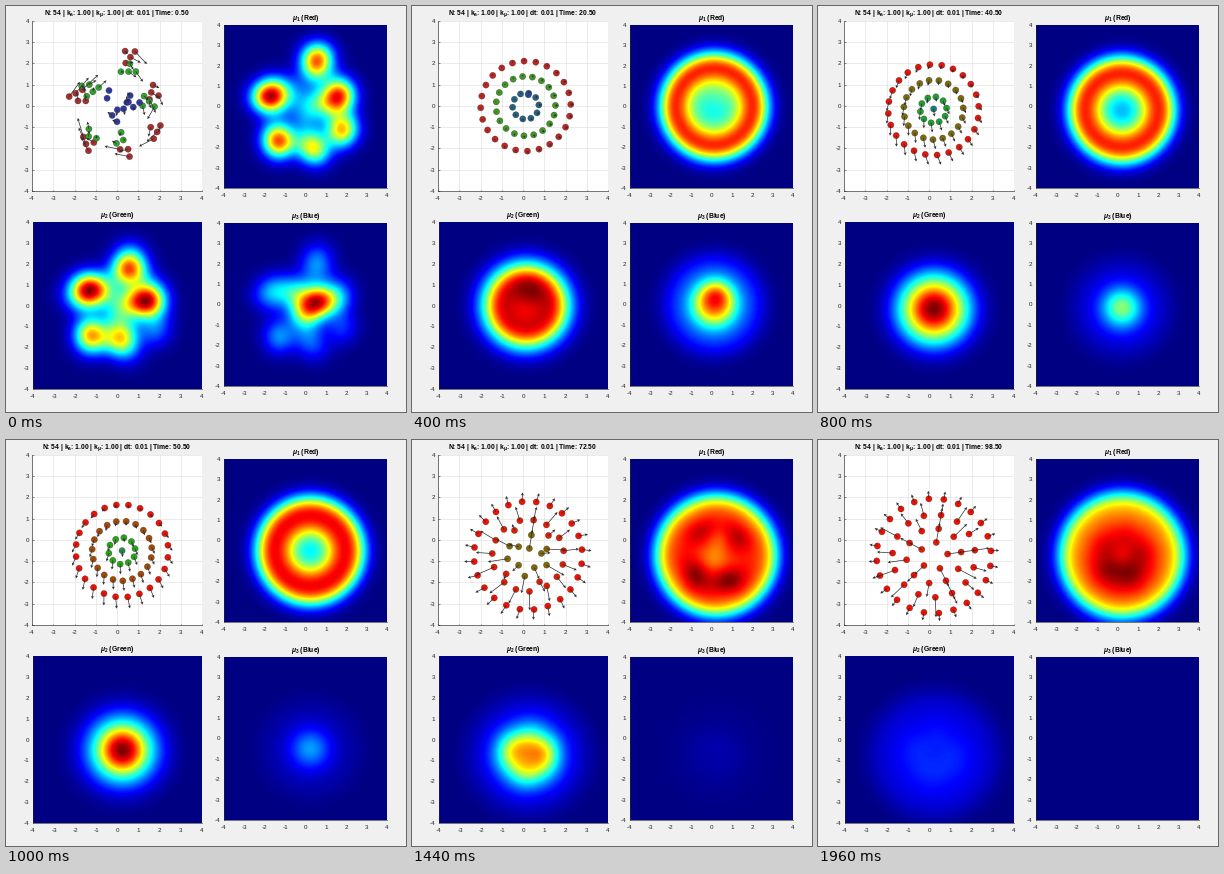
A matplotlib script that plays this animation: 400 by 406 pixels, repeating every 2 s.

```python
import numpy as np
import matplotlib.pyplot as plt
from matplotlib.animation import FuncAnimation
from matplotlib.colors import ListedColormap

W, H, DPI = 400, 406, 64
FRAMES, STEP = 50, 40
PT = 72 / DPI  # points per pixel

plt.rcParams.update({
    "font.family": "Liberation Sans",
    "mathtext.fontset": "custom",
    "mathtext.rm": "Liberation Sans:bold",
    "mathtext.it": "Liberation Sans:italic:bold",
    "axes.unicode_minus": False,
    "toolbar": "None",
})

SIZES = [24, 19, 10, 1]  # outer, mid, inner, core
GROUP = np.repeat(np.arange(4), SIZES)
SIGMA = 0.53
HUB = np.array([.23, -.75])
rng = np.random.default_rng(4)


def rise(t, mid, width):
    return 1 / (1 + np.exp((mid - t) / width))


def mix(a, b, u):
    return a + u * (b - a)


def ring(n, radius, phase=0):
    """n points evenly spaced clockwise from the top."""
    a = np.radians(phase + 360 * np.arange(n) / n)
    return radius * np.column_stack([np.sin(a), np.cos(a)])


def by_angle(p):
    return p[np.argsort(np.arctan2(p[:, 0], p[:, 1]) % (2 * np.pi))]


def clump(x, y, n):
    """Small sunflower of n points."""
    k = np.arange(n)
    a = 2.4 * k + rng.uniform(0, 2 * np.pi)
    r = .22 * np.sqrt(k + .4)
    return np.column_stack([x + r * np.cos(a), y + r * np.sin(a)])


# Clumps (x, y, count) of the scattered start
START = np.vstack([by_angle(np.vstack([clump(*c) for c in group])) for group in (
    [(.5, 2.35, 4), (1.75, .65, 4), (1.75, -1.2, 4),
     (.4, -2.1, 3), (-1.35, -1.7, 4), (-1.85, .5, 5)],
    [(.5, 1.75, 4), (1.45, .1, 4), (.2, -1.5, 3), (-1.2, -1.4, 3), (-1.25, .75, 5)],
    [(.6, .15, 5), (-.1, -.5, 3), (-.5, .5, 2)],
    [(.4, .2, 1)])])


def shells():
    """Closing layout: shells of 24, 15, 10 and 5 shared among the groups."""
    s24, s15, s10, s5 = (ring(n, r, 10) for n, r in
                         ((24, 2.7), (15, 1.95), (10, 1.3), (5, .65)))
    far = np.arange(10) % 5 % 3 == 1
    return HUB + np.vstack([s24, by_angle(np.vstack([s15, s10[far]])),
                            by_angle(np.vstack([s10[~far], s5[1:]])), s5[:1]])


LAST = shells()


def spread(t):
    return rise(t, 72, 5)


def home(t):
    """Concentric rings that sink, then open out into the shells."""
    radii = (2.12 + .3 * rise(t, 60, 6), 1.4, .62, .6 * rise(-t, -30, 4))
    phase = 13 - 6 * rise(t, 42, 5)
    rings = np.vstack([ring(n, r, phase) for n, r in zip(SIZES, radii)])
    rings += [.1 + .15 * rise(t, 32, 8), -.72 * rise(t, 46, 5)]
    return mix(rings, LAST, spread(t))


# Times at which each group turns from blue to green and from green to red
GREENED = np.array([-99, -99, 28, 45])[:, None]
REDDENED = np.array([-99, 43, 74, 74])[:, None]
RED_WIDTH = np.array([9, 13, 8, 8])[:, None]
DULL = .2 + .44 * np.eye(3)
VIVID = np.array([(.95, .06, .01), (.12, .70, .04), (.02, .40, .75)])


def colours(t):
    red, green, blue = mix(DULL, VIVID, rise(t, 28, 9))
    c = mix(blue, green, rise(t, GREENED, 9))
    return mix(c, red, rise(t, REDDENED, RED_WIDTH))[GROUP]


VARY = rng.uniform(.5, 1.4, len(GROUP))
REACH = np.where(GROUP == 0, .28, .65 * VARY)


def swarm(t):
    goal = home(t)
    pos = mix(goal, START, np.exp((.5 - t) / 3))
    out = goal - goal.mean(axis=0)
    out /= np.maximum(np.hypot(*out.T), .05)[:, None]
    push = out * (.1 + REACH * spread(t))[:, None]
    pull = .45 * (goal - pos)
    return pos, push + pull + 12 * (home(t + 1) - goal), colours(t)


def peaks(t):
    """Highest colour level of the red, green and blue fields."""
    return (1 - .16 * np.exp(-((t - 30) / 27) ** 4),
            .16 + .84 * rise(-t, -76, 4),
            rise(-t, -41, 10))


GRID = np.linspace(-4, 4, 101)


def fields(t, pos, rgb):
    gx, gy = (np.exp(-(GRID[:, None] - p) ** 2 / (2 * SIGMA ** 2)) for p in pos.T)
    # the middle gains weight as the rings open
    near = np.exp(-((pos - HUB - [0, -.3]) ** 2).sum(axis=1) / 2)
    weight = 1 + .6 * spread(t) * near
    for k, peak in enumerate(peaks(t)):
        f = (gy * (weight * rgb[:, k])) @ gx.T
        yield peak * f / f.max()


def jet():
    x = 4 * np.arange(1, 257) / 256
    return ListedColormap(np.clip(
        np.column_stack([1.5 - abs(x - c) for c in (3, 2, 1)]), 0, 1))


fig = plt.figure(figsize=(W / DPI, H / DPI), dpi=DPI, facecolor="#f0f0f0")


def panel(x0, y0, x1, y1, gap):
    ax = fig.add_axes([x0 / W, 1 - y1 / H, (x1 - x0) / W, (y1 - y0) / H])
    ax.set(xlim=(-4, 4), ylim=(-4, 4), xticks=range(-4, 5), yticks=range(-4, 5))
    ax.tick_params(length=0, labelsize=6.3 * PT, labelcolor="#262626")
    ax.tick_params(axis="x", pad=5 * PT)
    ax.tick_params(axis="y", pad=gap * PT)
    ax.spines[["top", "right"]].set_visible(False)
    ax.spines[["left", "bottom"]].set(linewidth=.6 * PT, color="#262626")
    return ax


def heading(x, y, s):
    return fig.text(x / W, 1 - y / H, s, ha="center", va="baseline",
                    weight="bold", size=6.75 * PT)


dots_ax = panel(26, 15, 196, 185, 3)
dots_ax.grid(color="#dfdfdf", linewidth=.6 * PT)
dots_ax.set_axisbelow(True)
dots_ax.tick_params(length=1.5 * PT, width=.5 * PT, direction="in", color="#262626")
title = heading(111, 9, "")

zero = np.zeros(len(GROUP))
dots = dots_ax.scatter(zero, zero, s=(6.2 * PT) ** 2, linewidths=.5 * PT,
                       edgecolors=(0, 0, 0, .45), zorder=3, clip_on=False)
quiver = dots_ax.quiver(zero, zero, zero, zero, angles="xy", scale_units="xy",
                        scale=1, units="dots", width=.7, headwidth=4.5,
                        headlength=4.5, headaxislength=3.5, minlength=0,
                        color="#2a2a2a", zorder=4)

images = []
for k, (box, name) in enumerate([((218, 19, 381, 182), "Red"),
                                 ((27, 216, 196, 383), "Green"),
                                 ((218, 217, 381, 380), "Blue")], 1):
    ax = panel(*box, 4)
    images.append(ax.imshow(np.zeros((101, 101)), cmap=jet(), vmin=0, vmax=1,
                            origin="lower", extent=(-4, 4, -4, 4), aspect="auto",
                            interpolation="bilinear"))
    heading((box[0] + box[2]) / 2, box[1] - 5.3,
            rf"$\mu_{{\mathregular{{{k}}}}}$ ({name})")


def draw(i):
    t = 0.5 + 2 * i
    pos, arrow, rgb = swarm(t)
    dots.set_offsets(pos)
    dots.set_facecolors(rgb)
    quiver.set_offsets(pos)
    quiver.XY = pos
    quiver.X, quiver.Y = pos.T
    quiver.set_UVC(*arrow.T)
    for im, f in zip(images, fields(t, pos, rgb)):
        im.set_data(f)
    title.set_text(r"N: 54 | k$_\mathregular{a}$: 1.00 | k$_\mathregular{\mu}$: 1.00"
                   f" | dt: 0.01 | Time: {t:.2f}")
    return [dots, quiver, title, *images]


anim = FuncAnimation(fig, draw, frames=FRAMES, interval=STEP, repeat=True,
                     repeat_delay=0, blit=False)
plt.show()
```
